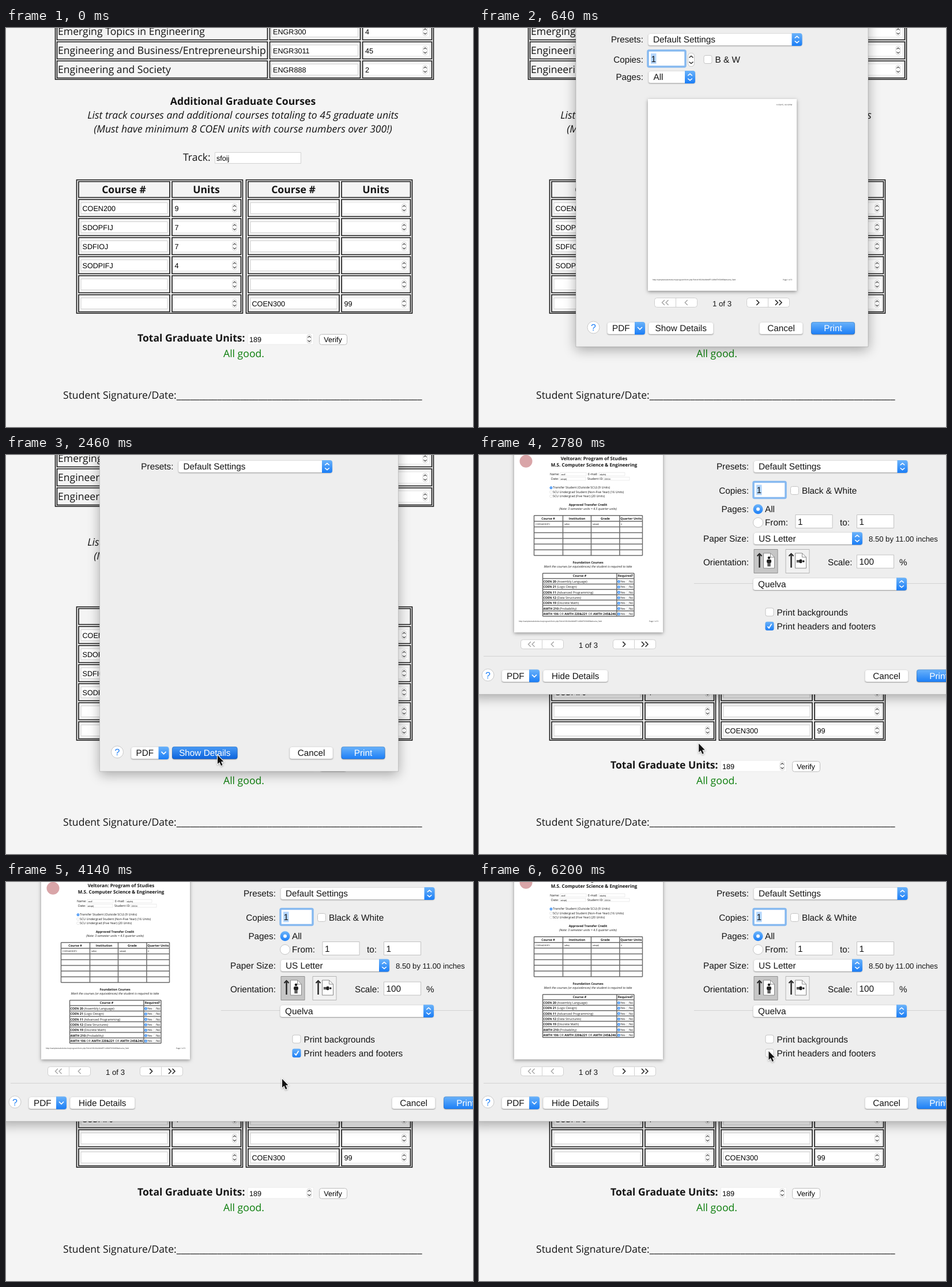
An HTML page with a canvas that plays this animation: 810 by 691 pixels, repeating every 6.22 s.

```html
<!DOCTYPE html>
<html lang="en">
<head>
<meta charset="utf-8">
<title>Print a program form</title>
<style>
html, body { margin: 0; width: 100%; height: 100%; overflow: hidden; background: #f4f4f4; }
canvas { display: block; }
</style>
</head>
<body>
<canvas id="stage" width="810" height="691"></canvas>
<script>
const c = document.getElementById('stage').getContext('2d');
c.textRendering = 'geometricPrecision';
const LOOP = 6220, INK = '#151515';
const OPEN = { start: 200, end: 480 };
const GROW = { start: 2430, end: 2710 };
const LOADED = 900, PRESS = 2250, UNCHECK = 4900;

const open = (size, style = '') => `${style} ${size}px "Open Sans", sans-serif`;
const sans = size => `${size}px "Liberation Sans", Arial, sans-serif`;
const UI = sans(15.3), FIELD = sans(12.6), BODY = open(17.6), BOLD = open(17.6, 'bold');
const MINI = open(5.35), MINI_BOLD = open(5.35, 'bold');

const clamp = v => Math.max(0, Math.min(1, v));
const ease = v => 0.5 - 0.5 * Math.cos(Math.PI * clamp(v));
const phase = (t, span) => (t - span.start) / (span.end - span.start);

function text(s, x, y, font, color = INK, align = 'left') {
  c.font = font;
  c.fillStyle = color;
  c.textAlign = align;
  c.fillText(s, x, y);
}

function box(x, y, w, h, fill, stroke, r = 0, lw = 1) {
  c.beginPath();
  c.roundRect(x, y, w, h, r);
  if (fill) { c.fillStyle = fill; c.fill(); }
  if (stroke) { c.strokeStyle = stroke; c.lineWidth = lw; c.stroke(); }
}

function disc(x, y, r, fill, stroke, lw = 1) {
  box(x - r, y - r, 2 * r, 2 * r, fill, stroke, r, lw);
}

function line(points, color, lw = 1) {
  c.beginPath();
  points.forEach(([x, y]) => c.lineTo(x, y));
  c.strokeStyle = color;
  c.lineWidth = lw;
  c.stroke();
}

// Chevron pointing along (dx, dy), one of which is 0
function chevron(x, y, dx, dy, color, lw = 1.5) {
  line([[x - dx - 2 * dy, y - dy - 2 * dx], [x + dx, y + dy], [x - dx + 2 * dy, y - dy + 2 * dx]], color, lw);
}

function upDown(x, y, gap, size, color, lw) {
  const wide = size * 1.2;
  for (const d of [-1, 1])
    line([[x - wide, y + d * gap], [x, y + d * (gap + size)], [x + wide, y + d * gap]], color, lw);
}

function blue(y, h, dark) {
  const g = c.createLinearGradient(0, y, 0, y + h);
  g.addColorStop(0, dark ? '#4a9bf5' : '#6bb3fa');
  g.addColorStop(1, dark ? '#0a62dc' : '#1a7df6');
  return g;
}

/* ---- Web form ---- */

function input(x, cy, w, value = '', spin = false) {
  box(x + .5, cy - 9.5, w - 1, 19, '#fff', spin ? '#ececec' : '#d2d2d2');
  text(value, x + 3, cy + 5, FIELD, '#000');
  if (!spin) return;
  box(x + w - 12, cy - 7.5, 8, 15, '#fafafa', '#d4d4d4', 4);
  upDown(x + w - 8, cy, 2.4, 2.2, '#444', 1.2);
}

const frame = (x, y, w, h) => box(x, y, w, h, null, '#161616', 0, 1.6);

function courses(x, rows) {
  frame(x, 263, 288, 231);
  frame(x + 3.5, 266, 158, 27.5);
  frame(x + 165.5, 266, 119.5, 27.5);
  text('Course #', x + 82, 286, BOLD, INK, 'center');
  text('Units', x + 225, 286, BOLD, INK, 'center');
  rows.forEach(([name, units], i) => {
    const y = 312 + 33 * i;
    frame(x + 3.5, y - 15, 158, 29.5);
    frame(x + 165.5, y - 15, 119.5, 29.5);
    input(x + 7, y, 151, name);
    input(x + 167, y, 115, units, true);
  });
}

function drawForm() {
  c.fillStyle = '#f4f4f4';
  c.fillRect(0, 0, 810, 691);
  frame(85.5, -20, 656, 109);
  [['Emerging Topics in Engineering', 'ENGR300', '4'],
   ['Engineering and Business/Entrepreneurship', 'ENGR3011', '45'],
   ['Engineering and Society', 'ENGR888', '2']].forEach(([title, code, units], i) => {
    const y = 6 + 33 * i;
    frame(88.5, y - 15, 365, 29.5);
    frame(457.5, y - 15, 157, 29.5);
    frame(618.5, y - 15, 120, 29.5);
    text(title, 90, y + 6, BODY);
    input(460, y, 151, code);
    input(620, y, 115, units, true);
  });
  const italic = open(17.6, 'italic');
  text('Additional Graduate Courses', 411, 133, BOLD, INK, 'center');
  text('List track courses and additional courses totaling to 45 graduate units', 411, 157, italic, INK, 'center');
  text('(Must have minimum 8 COEN units with course numbers over 300!)', 411, 181, italic, INK, 'center');
  text('Track:', 307, 230, BODY);
  input(362, 225, 150, 'sfoij');

  const blank = ['', ''];
  courses(122.5, [['COEN200', '9'], ['SDOPFIJ', '7'], ['SDFIOJ', '7'], ['SODPIFJ', '4'], blank, blank]);
  courses(416.5, [blank, blank, blank, blank, blank, ['COEN300', '99']]);

  text('Total Graduate Units:', 228, 543, BOLD);
  input(419, 538.5, 115, '189', true);
  box(543.5, 530.5, 48, 18, '#fff', '#bdbdbd', 4);
  text('Verify', 567, 543.5, FIELD, '#000', 'center');
  text('All good.', 412.5, 570, BODY, '#0a7d0a', 'center');
  text('Student Signature/Date:' + '_'.repeat(54), 99, 642, BODY);
}

/* ---- Page preview, in the coordinates of the compact sheet ---- */

function miniGrid(xs, ys) {
  const [l, r, t, b] = [xs[0], xs.at(-1), ys[0], ys.at(-1)];
  xs.forEach(x => line([[x, t], [x, b]], '#6a6a6a', 1.5));
  ys.forEach(y => line([[l, y], [r, y]], '#6a6a6a', 1.5));
}

function miniField(label, x, y, fx, value) {
  text(label, x, y, MINI);
  box(fx, y - 5, 45, 5.6, '#fff', '#ddd', 0, .6);
  text(value, fx + 1.5, y - .6, sans(3.7));
}

const steps = (from, gap, n) => Array.from({ length: n }, (_, i) => from + gap * i);

function miniRadio(x, y, on) {
  disc(x, y, 2.4, on ? '#2b86f3' : '#fff', on ? null : '#d5d5d5', .6);
  if (on) disc(x, y, .9, '#fff');
}

function miniPage() {
  const mid = (s, y, font, x = 421) => text(s, x, y, font, INK, 'center');
  const italic = open(5.35, 'italic');
  disc(313.5, 158.5, 11, '#d9a5a8');
  mid('Veltoran: Program of Studies', 157, open(8.1, 'bold'), 431.5);
  mid('M.S. Computer Science & Engineering', 168, open(8.1, 'bold'), 431.5);
  miniField('Name:', 355, 183, 373, 'asdf');
  miniField('E-mail:', 421, 183, 440, 'sdpfoij');
  miniField('Date:', 357, 191, 372, 'sdoipfj');
  miniField('Student ID:', 420, 191, 448, '20634');
  ['Transfer Student (Outside SCU) (9 Units)',
   'SCU Undergrad Student (Non-Five Year) (16 Units)',
   'SCU Undergrad (Five Year) (20 Units)'].forEach((s, i) => {
    miniRadio(357, 204.5 + 7.3 * i, i === 0);
    text(s, 360, 206 + 7.3 * i, MINI);
  });
  mid('Approved Transfer Credit', 235.5, MINI_BOLD);
  mid('(Note: 3 semester units = 4.5 quarter units)', 242.5, italic);
  miniGrid([327.5, 377.5, 426.5, 476, 515.5], steps(252.5, 9.9, 8));
  ['Course #', 'Institution', 'Grade', 'Quarter Units'].forEach((s, i) => mid(s, 259.3, MINI_BOLD, [352, 402, 451, 495.7][i]));
  ['COENADSOFJ', 'sdfoij', 'sdoipfj', '4'].forEach((s, i) => text(s, [330, 380, 429, 478][i], 268.3, sans(3.7)));
  mid('Foundation Courses', 335.5, MINI_BOLD);
  mid('Mark the courses (or equivalences) the student is required to take', 342.7, italic);
  miniGrid([342.5, 471, 501], steps(352.5, 9.3, 9));
  mid('Course #', 359, MINI_BOLD, 406.5);
  mid('Required?', 359, MINI_BOLD, 486);
  // "|" switches between bold and regular
  ['COEN 20| (Assembly Language)', 'COEN 21| (Logic Design)', 'COEN 11| (Advanced Programming)',
   'COEN 12| (Data Structures)', 'COEN 19| (Discrete Math)', 'AMTH 210| (Probability)',
   'AMTH 106| OR |AMTH 220&221| OR |AMTH 245&246'].forEach((row, i) => {
    const y = 368.5 + 9.35 * i;
    let x = 343.5;
    row.split('|').forEach((s, k) => {
      text(s, x, y, k % 2 ? MINI : MINI_BOLD);
      x += c.measureText(s).width;
    });
    miniRadio(474.5, y - 1.5, true);
    text('Yes', 477.3, y, MINI);
    miniRadio(489.5, y - 1.5, false);
    text('No', 492.3, y, MINI);
  });
}

function preview(dx, dy, loaded, headers) {
  c.save();
  c.translate(dx, dy);
  c.shadowColor = 'rgba(0,0,0,.4)';
  c.shadowBlur = 6;
  c.shadowOffsetY = 2;
  box(293, 123, 258, 332, '#fff');
  c.shadowColor = 'transparent';
  c.save();
  if (!headers) c.translate(0, -10);
  if (loaded) miniPage();
  c.restore();
  if (headers) {
    const tiny = open(3.1);
    text('11/30/15, 10:10 PM', 543, 133.5, tiny, INK, 'right');
    text('http://samplestudentsite.me/program/form.php?fid=id18526bL9bMFF122RbETK5D6f0&dname_field', 301, 437, tiny);
    text('Page 1 of 3', 543, 437, tiny, INK, 'right');
  }
  for (const [x, dir, color] of [[304.5, -1, '#aaa'], [464.5, 1, '#222']]) {
    box(x, 467.5, 74, 16, '#fff', '#cfcfcf', 4);
    line([[x + 37, 468], [x + 37, 483]], '#cfcfcf');
    const double = dir < 0 ? x + 18.5 : x + 55;
    chevron(dir < 0 ? x + 55 : x + 19, 475.5, 2.2 * dir, 0, color);
    chevron(double - 3.3, 475.5, 2.2 * dir, 0, color);
    chevron(double + 3.3, 475.5, 2.2 * dir, 0, color);
  }
  text('1 of 3', 421.5, 481.5, sans(13.2), INK, 'center');
  c.restore();
}

/* ---- Print sheet ---- */

const label = (s, x, y) => text(s, x, y, UI, INK, 'right');

function control(x, y, w, fill = '#fff') {
  c.save();
  c.shadowColor = 'rgba(0,0,0,.3)';
  c.shadowBlur = 1.5;
  c.shadowOffsetY = 1;
  box(x, y, w, 21.5, fill, null, 4);
  c.restore();
  box(x + .5, y + .5, w - 1, 21, null, 'rgba(0,0,0,.13)', 4);
}

function popup(x, y, w, value, single) {
  control(x, y, w);
  box(x + w - 18, y, 18, 22, blue(y, 22), null, [0, 4, 4, 0]);
  const ax = x + w - 9, ay = y + 11;
  if (single) chevron(ax, ay, 0, 2, '#fff', 1.7);
  else upDown(ax, ay, 2.5, 3.2, '#fff', 1.6);
  text(value, x + 9, y + 16.3, UI);
}

function button(x, y, w, name, active, dark) {
  control(x, y, w, active ? blue(y, 22, dark) : '#fff');
  text(name, x + w / 2, y + 16.3, UI, active ? '#fff' : INK, 'center');
}

function field(x, y, w, value) {
  box(x + .5, y + .5, w - 1, 23, '#fff', '#c2c2c2');
  text(value, x + 4.5, y + 17.5, UI);
}

function focused(x, y, w) {
  box(x - 1, y - 1, w + 2, 28, '#fff', '#86b9f0', 2, 3.5);
  box(x + 4, y + 4, 9.5, 18, '#b4d6fc');
  text('1', x + 4.5, y + 18.8, UI);
}

function checkbox(x, y, name, on = 0, pressed = false) {
  box(x + .5, y + .5, 14, 14, '#fff', '#c4c4c4', 3);
  if (on) {
    c.globalAlpha = on;
    box(x, y, 15, 15, blue(y, 15, pressed), null, 3);
    line([[x + 4, y + 8], [x + 6.5, y + 11], [x + 11, y + 3.8]], '#fff', 1.8);
    c.globalAlpha = 1;
  }
  text(name, x + 20, y + 13.3, UI);
}

function radio(y, name, on) {
  disc(484, y, 8.5, on ? blue(y - 8, 17) : '#fff', on ? null : '#c4c4c4');
  if (on) disc(484, y, 3, '#fff');
  text(name, 496, y + 5.3, UI);
}

function orientation(x, chosen) {
  box(x + .5, 163.5, 41, 41, chosen ? '#c6c6c6' : '#f1f1f1', chosen ? '#8f8f8f' : '#b5b5b5');
  line([[x + 10, 195], [x + 10, 173]], '#222', 2.4);
  chevron(x + 10, 173, 0, -2, '#222', 2);
  c.beginPath();
  [[17, 170], [29, 170], [36, 177], [36, 196], [17, 196]].forEach(([px, py]) => c.lineTo(x + px, py));
  c.closePath();
  c.fillStyle = '#fff';
  c.fill();
  line([[x + 17, 196], [x + 17, 170], [x + 29, 170], [x + 36, 177], [x + 36, 196], [x + 17, 196]], '#888');
  line([[x + 29, 170], [x + 29, 177], [x + 36, 177]], '#888');
  c.save();
  c.translate(x + 26.5, 184);
  if (!chosen) { c.rotate(Math.PI / 2); c.scale(.8, .8); }
  disc(0, -6, 2.3, '#222');
  box(-4, -3, 8, 6, '#222', null, 2);
  box(-2.4, 0, 2, 9, '#222');
  box(.4, 0, 2, 9, '#222');
  c.restore();
}

function compactPane(t) {
  label('Copies:', 285, 60);
  focused(294, 40, 63);
  box(362.5, 43.5, 11, 23, '#fff', '#c4c4c4', 5);
  upDown(368, 55, 3.6, 2.9, '#333', 1.4);
  checkbox(389.5, 47, 'B & W');
  label('Pages:', 285, 90.3);
  popup(293.5, 74, 81.5, 'All');
  preview(0, 0, t >= LOADED, true);
}

function detailPane(t) {
  const headers = t < UNCHECK;
  preview(-232, -147.7, true, headers);
  label('Copies:', 468, 67);
  focused(477, 47.5, 54);
  checkbox(540, 54, 'Black & White');
  label('Pages:', 468, 99.3);
  radio(93.7, 'All', true);
  radio(117, 'From:', false);
  field(548.5, 103, 65, '1');
  text('to:', 626, 122, UI);
  field(655, 103, 65, '1');
  label('Paper Size:', 468, 150);
  popup(476, 133.5, 189, 'US Letter');
  text('8.50 by 11.00 inches', 676, 150, sans(13.1));
  label('Orientation:', 468, 190.7);
  orientation(476.5, true);
  orientation(531.5, false);
  text('Scale:', 605, 190.7, UI);
  field(655, 172.5, 65, '100');
  text('%', 729, 190.7, UI);
  line([[373, 222.5], [810, 222.5]], '#d2d2d2');
  popup(475, 212.5, 267, 'Quelva');
  checkbox(496.5, 264.5, 'Print backgrounds');
  checkbox(496.5, 288.8, 'Print headers and footers', 1 - clamp((t - UNCHECK) / 150), t > UNCHECK - 200);
  line([[8, 348.5], [810, 348.5]], '#d2d2d2');
}

function drawSheet(t) {
  const slide = ease(phase(t, OPEN));
  if (!slide) return;
  const grow = ease(phase(t, GROW)), shift = 183 * grow;
  const left = 168 - shift, bottom = 552 - 137.5 * grow;
  c.save();
  c.translate(0, -580 * (1 - slide));
  c.save();
  c.shadowColor = 'rgba(0,0,0,.33)';
  c.shadowBlur = 20;
  c.shadowOffsetY = 5;
  box(left, -60, 507 + 2 * shift, bottom + 60, '#eee');
  c.restore();
  box(left, -60, 507 + 2 * shift, bottom + 60, '#eee', 'rgba(0,0,0,.2)', 0, .8);

  label('Presets:', 285 + shift, 25.3);
  popup(293 + shift, 9, 267.5, 'Default Settings');
  if (t < GROW.start) compactPane(t);
  else if (grow === 1) detailPane(t);

  const y = bottom - 43, expanded = grow === 1, pressed = t > PRESS && !expanded;
  disc(left + 30.5, y + 9.5, 10.5, '#fff', '#c8c8c8');
  text('?', left + 30.5, y + 15, sans(16), '#1a7df6', 'center');
  popup(left + 54, y, 66, 'PDF', true);
  button(left + 125.5, y, 113.5, expanded ? 'Hide Details' : 'Show Details', pressed, true);
  button(486 + shift, y, 76, 'Cancel');
  button(576 + shift, y, 76, 'Print', true);
  c.restore();
}

/* ---- Pointer: time, x, y ---- */

const path = [[1050, 428, 700], [1350, 401, 593], [1700, 401, 593], [2200, 367, 520],
  [2600, 367, 520], [3250, 446.5, 407.5], [3700, 446.5, 407.5], [4500, 502.5, 293]];

function drawPointer(t) {
  if (t < path[0][0]) return;
  const i = path.findLastIndex(k => k[0] <= t);
  const a = path[i], b = path[i + 1] || a;
  const f = a === b ? 0 : ease((t - a[0]) / (b[0] - a[0]));
  c.save();
  c.translate(a[1] + (b[1] - a[1]) * f, a[2] + (b[2] - a[2]) * f);
  c.beginPath();
  [[0, 0], [0, 15], [3.4, 12], [6, 18], [8.6, 17], [6, 11], [10.5, 11]].forEach(p => c.lineTo(...p));
  c.closePath();
  c.shadowColor = 'rgba(0,0,0,.35)';
  c.shadowBlur = 3;
  c.shadowOffsetY = 1;
  c.strokeStyle = '#fff';
  c.lineWidth = 2;
  c.stroke();
  c.shadowColor = 'transparent';
  c.fillStyle = '#111';
  c.fill();
  c.restore();
}

const begin = performance.now();
function draw() {
  const t = (performance.now() - begin) % LOOP;
  drawForm();
  drawSheet(t);
  drawPointer(t);
  requestAnimationFrame(draw);
}
draw();
</script>
</body>
</html>
```
